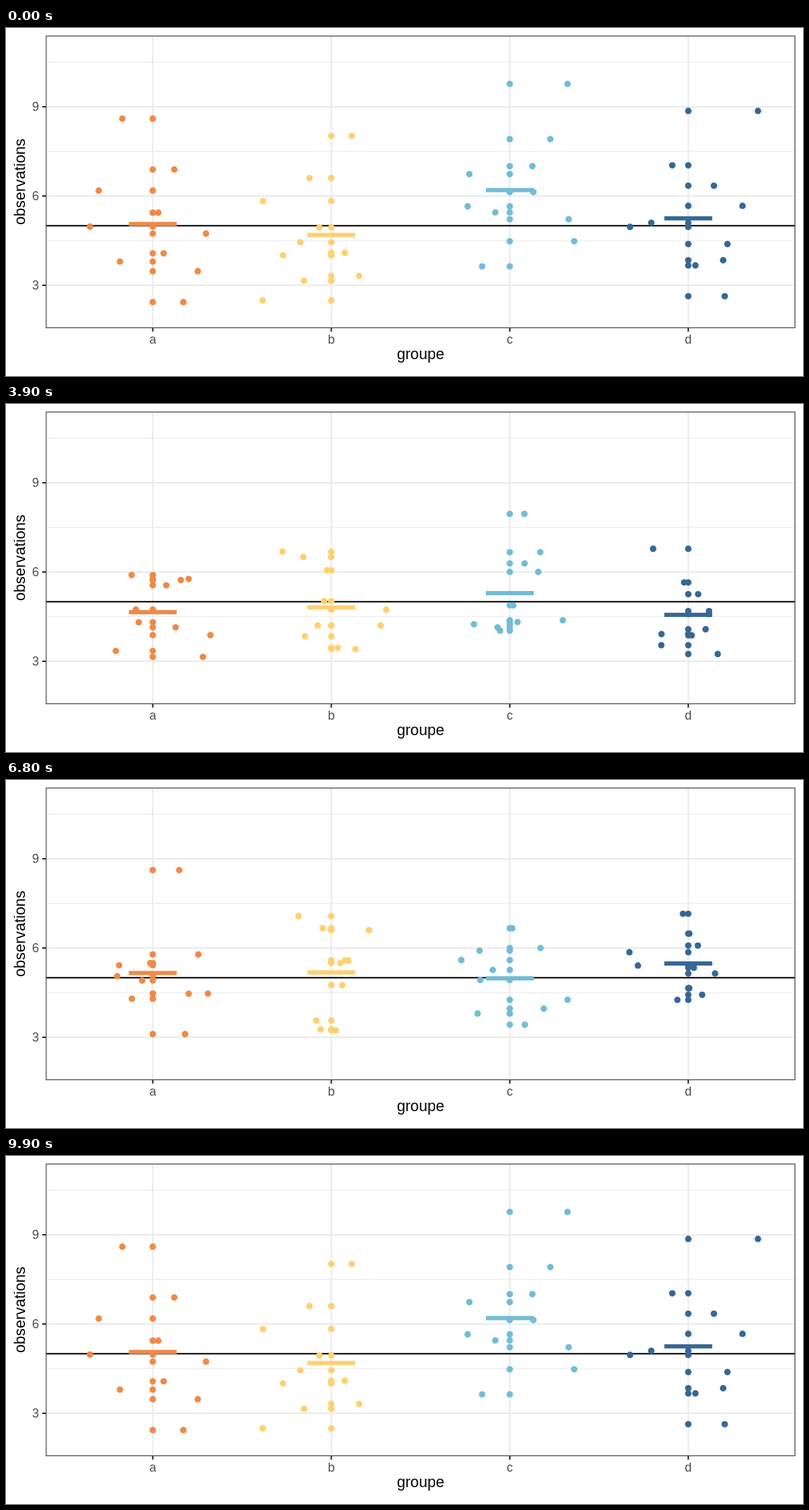
Recreate the animation shown at these times as an HTML page. Size 1131 px wide and 495 px high, loop 10000 ms.

```html
<!DOCTYPE html>
<html lang="fr">
<head>
<meta charset="utf-8">
<title>Observations par groupe</title>
<style>
  html, body { margin: 0; width: 100%; height: 100%; overflow: hidden; background: #fff; }
  svg { display: block; width: 100%; height: 100%; }
  text { font-family: "Liberation Sans", Arial, sans-serif; font-size: 17.6px; fill: #4d4d4d; }
  .title { font-size: 21.6px; fill: #000; text-anchor: middle; }
  .grid { stroke: #ebebeb; stroke-width: 2.13; }
  .minor { stroke-width: 1.07; }
  .tick { stroke: #333; stroke-width: 2.13; }
  .border { fill: none; stroke: #333; stroke-width: 1.07; }
  .reference { stroke: #000; stroke-width: 2.13; }
</style>
</head>
<body>
<svg id="plot" viewBox="0 0 1131 495"></svg>
<script>
const plot = document.getElementById('plot');
const colors = ['#ef8a47', '#ffd06f', '#72bcd5', '#376795'];
const panel = { left: 57, right: 1119.6, top: 11.4, bottom: 426.4 };
const centerX = group => 208.3 + 253.3 * group;
const scaleY = value => 239 - 42.3 * (value - 6);

function add(tag, attributes, content = '') {
  const node = document.createElementNS('http://www.w3.org/2000/svg', tag);
  for (const name in attributes) node.setAttribute(name, attributes[name]);
  node.textContent = content;
  return plot.appendChild(node);
}
const line = (type, x1, y1, x2, y2) => add('line', { class: type, x1, y1, x2, y2 });
const across = (type, value) =>
  line(type, panel.left, scaleY(value), panel.right, scaleY(value));

// Axes and grid
[4.5, 7.5, 10.5].forEach(value => across('grid minor', value));
[3, 6, 9].forEach(value => {
  const y = scaleY(value);
  across('grid', value);
  line('tick', panel.left - 5.7, y, panel.left, y);
  add('text', { x: 46.8, y: y + 6.3, 'text-anchor': 'end' }, value);
});
['a', 'b', 'c', 'd'].forEach((name, group) => {
  const x = centerX(group);
  line('grid', x, panel.top, x, panel.bottom);
  line('tick', x, panel.bottom, x, panel.bottom + 5.5);
  add('text', { x, y: 449, 'text-anchor': 'middle' }, name);
});
across('reference', 5);
add('text', { class: 'title', x: 588.3, y: 471.4 }, 'groupe');
add('text', { class: 'title', transform: 'translate(26.8 218.7) rotate(-90)' }, 'observations');

// Mean of groups a to d in each successive sample
const means = [
  [5.06, 4.69, 6.20, 5.25],
  [6.08, 5.51, 4.88, 4.29],
  [5.20, 4.60, 5.50, 4.80],
  [4.20, 5.10, 4.90, 4.90],
  [5.10, 4.52, 5.68, 4.22],
  [6.00, 5.10, 4.52, 5.48],
  [5.50, 4.80, 5.20, 6.10],
  [4.82, 5.56, 4.76, 4.86],
  [4.90, 4.70, 5.20, 4.60],
  [4.40, 5.42, 4.58, 5.30]
];
const POINTS = 10, SPREAD = 1.7, JITTER = 101;

let seed = 4217;
const random = () => (seed = (seed * 16807) % 2147483647) / 2147483647;
const noise = size => (2 * random() - 1) * size;
const average = list => list.reduce((sum, value) => sum + value, 0) / list.length;

function shuffle(list) {
  for (let i = list.length - 1; i > 0; i--) {
    const j = Math.floor(random() * (i + 1));
    [list[i], list[j]] = [list[j], list[i]];
  }
  return list;
}

// Bell-shaped values, slightly skewed upwards, centred exactly on the mean
function drawGroup(mean) {
  const values = Array.from({ length: POINTS }, (_, i) => {
    const p = (i + 0.5) / POINTS;
    const z = Math.log(p / (1 - p)) / 1.7;
    return SPREAD * (z + 0.15 * (z * z - 1)) + noise(0.25);
  });
  const shift = mean - average(values);
  return shuffle(values).map(value => ({ value: value + shift, dx: noise(JITTER) }));
}
const samples = means.map(groups => groups.map(drawGroup));

// Marks
const marks = colors.map((fill, group) => {
  const x = centerX(group);
  const dot = () => add('circle', { r: 4.6, cx: x, fill });
  return {
    x,
    bar: add('rect', { x: x - 34, width: 68, height: 6, fill }),
    dots: Array.from({ length: POINTS }, () => ({ center: dot(), side: dot() }))
  };
});
add('rect', {
  class: 'border', x: panel.left, y: panel.top,
  width: panel.right - panel.left, height: panel.bottom - panel.top
});

// Departure of each transition, in steps of 100 ms
const departures = [9, 19, 29, 39, 49, 58, 68, 78, 88, 98];
const mix = (from, to, amount) => from + (to - from) * amount;

function show(step) {
  const index = departures.filter(start => start <= step).length - 1;
  const from = samples[Math.max(index, 0)];
  const to = samples[(index + 1) % samples.length];
  const length = index === 0 ? 3 : 2;
  const amount = index < 0 ? 0 : Math.min(1, (step - departures[index] + 1) / length);

  marks.forEach(({ x, bar, dots }, g) => {
    const heights = dots.map(({ center, side }, i) => {
      const start = from[g][i], end = to[g][i];
      const y = scaleY(mix(start.value, end.value, amount));
      center.setAttribute('cy', y);
      side.setAttribute('cy', y);
      side.setAttribute('cx', x + mix(start.dx, end.dx, amount));
      return y;
    });
    bar.setAttribute('y', average(heights) - 3);
  });
}

let shown = -1;
function tick(now) {
  const step = Math.floor((now % 10000) / 100);
  if (step !== shown) show(shown = step);
  requestAnimationFrame(tick);
}
show(0);
requestAnimationFrame(tick);
</script>
</body>
</html>
```
